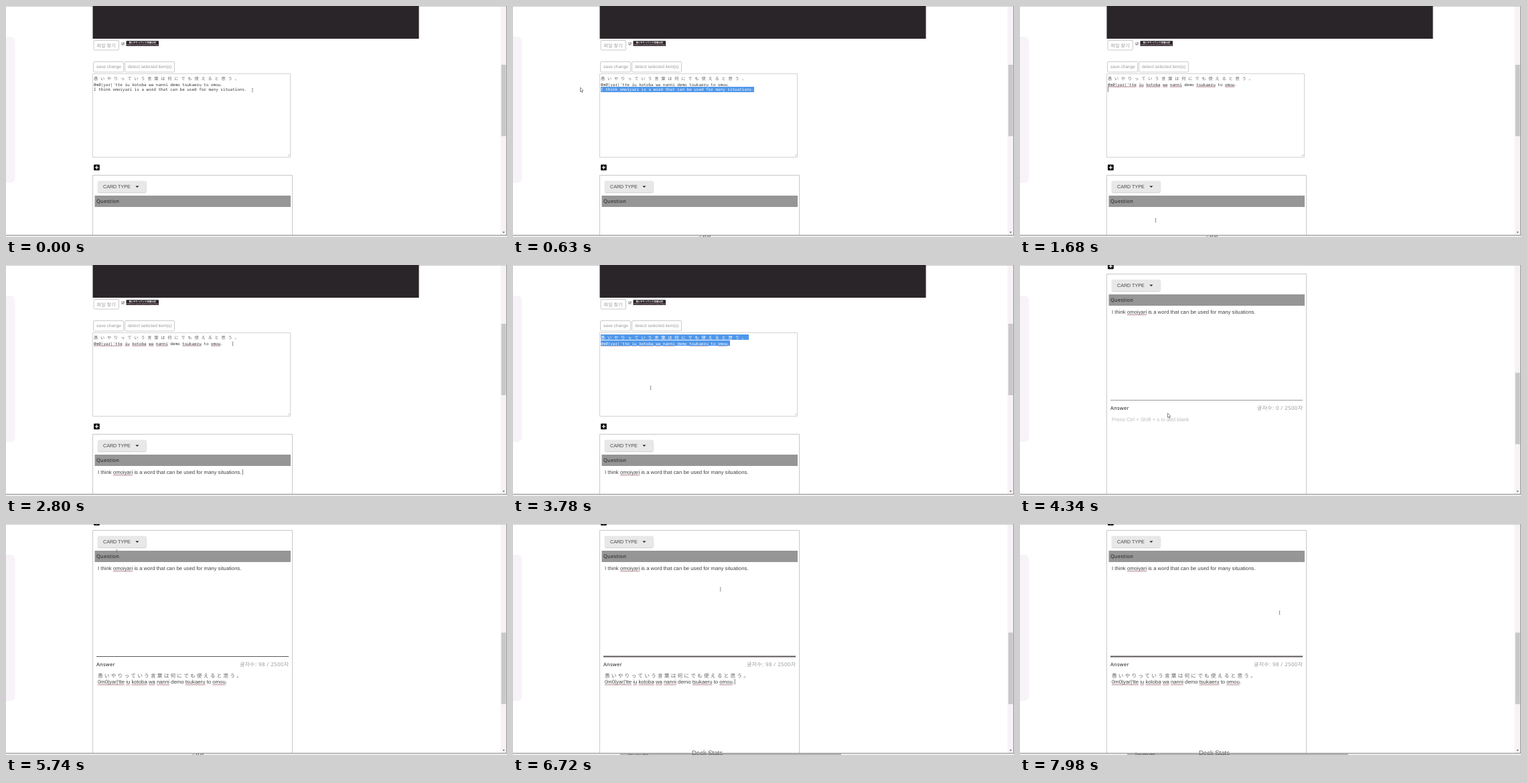
Recreate the animation shown at these times as an HTML page with a canvas. Size 748 by 346 pixels, loop 8000 ms.

```html
<!DOCTYPE html>
<html lang="en">
<head>
<meta charset="utf-8">
<title>Flash card editor</title>
<style>
  html, body { margin: 0; height: 100%; overflow: hidden; background: #fff; }
  canvas { display: block; width: 748px; height: 346px; }
</style>
</head>
<body>
<canvas id="stage"></canvas>
<script>
const W = 748, H = 346, LOOP = 8000, STEP = 70;
const canvas = document.getElementById('stage');
const ratio = window.devicePixelRatio || 1;
canvas.width = W * ratio;
canvas.height = H * ratio;
const c = canvas.getContext('2d');

const SANS = '"Liberation Sans", "Noto Sans CJK JP", "Noto Sans CJK KR", sans-serif';
const LABEL = '"Noto Sans", "Noto Sans CJK KR", sans-serif';
const MONO = '"Noto Sans Mono", "Noto Sans CJK JP", monospace';
const BODY = '7.78px ' + SANS;

const JAPANESE = '愚 い や り っ て い う 言 葉 は 何 に で も 使 え る と 思 う 。';
const ROMAJI = "0m0|yar|'tte iu kotoba wa nanni demo tsukaeru to omou.";
const ENGLISH = 'I think omoiyari is a word that can be used for many situations.';
const MISSPELT = ["0m0|yar|'tte", 'iu', 'kotoba', 'wa', 'nanni', 'tsukaeru', 'omou', 'omoiyari'];

const NOTE = [
  { text: JAPANESE, font: '300 6.28px ' + MONO, color: '#666', base: 110.8, top: 104, end: 352 },
  { text: ROMAJI, font: '5.96px ' + MONO, color: '#333', base: 119.6, top: 113, end: 324 },
  { text: ENGLISH, font: '5.96px ' + MONO, color: '#333', base: 127.1, top: 121, end: 360 }
];

const MOUSE = [
  [0, 367.5, 126], [70, 366, 126], [630, 101, 126], [980, 101, 126], [1680, 202, 321],
  [1750, 187, 320], [2380, 187, 320], [2800, 338, 118], [2900, 338, 118], [3290, 99, 92],
  [3430, 99, 92], [3710, 205, 184], [3780, 205, 184], [3920, 224, 212], [4130, 224, 212],
  [4200, 224, 215], [4340, 221, 226], [5460, 221, 226], [5740, 165, 41], [5880, 166, 33],
  [6510, 166, 33], [6860, 387, 133]
];
const SCROLL = [[4060, 0], [4130, 3], [4200, 22], [4270, 131], [4340, 240], [4410, 243.5], [4480, 244]];

const linear = k => k;
const smooth = k => k * k * (3 - 2 * k);
const clamp = (v, lo, hi) => Math.min(hi, Math.max(lo, v));
const within = (t, from, to) => t >= from && t < to;

// Values of a keyframe track at time t
function track(keys, t, ease) {
  const i = keys.findIndex(k => k[0] > t);
  if (i === 0) return keys[0].slice(1);
  if (i < 0) return keys[keys.length - 1].slice(1);
  const a = keys[i - 1], b = keys[i];
  const k = ease((t - a[0]) / (b[0] - a[0]));
  return a.slice(1).map((v, n) => v + (b[n + 1] - v) * k);
}

function rect(x, y, w, h, fill) {
  c.fillStyle = fill;
  c.fillRect(x, y, w, h);
}

function round(x, y, w, h, r, fill, stroke) {
  c.beginPath();
  c.roundRect(x, y, w, h, r);
  if (fill) { c.fillStyle = fill; c.fill(); }
  if (stroke) { c.strokeStyle = stroke; c.lineWidth = 1; c.stroke(); }
}

function path(points, fill) {
  c.beginPath();
  points.forEach(p => c.lineTo(...p));
  c.closePath();
  c.fillStyle = fill;
  c.fill();
}

function line(x1, y1, x2, y2, color, width = 1) {
  c.beginPath();
  c.moveTo(x1, y1);
  c.lineTo(x2, y2);
  c.strokeStyle = color;
  c.lineWidth = width;
  c.stroke();
}

function text(string, x, y, font, color, spacing = 0, align = 'left') {
  c.font = font;
  c.letterSpacing = spacing + 'px';
  c.textAlign = align;
  c.fillStyle = color;
  c.fillText(string, x, y);
}

function underline(string, x, y, font) {
  c.font = font;
  c.letterSpacing = '0px';
  c.textAlign = 'left';
  let at = 0;
  for (const part of string.split(' ')) {
    const word = part.replace(/\.$/, '');
    if (MISSPELT.includes(word)) {
      const left = x + c.measureText(string.slice(0, at)).width;
      line(left, y, left + c.measureText(word).width, y, '#a0646a', 0.8);
    }
    at += part.length + 1;
  }
}

const caret = (x, y) => rect(x, y, 0.8, 8.5, '#666');

function button(label, x, y, w, h, base, size) {
  round(x, y, w, h, 1.5, '#fff', '#cacaca');
  text(label, x + 4.5, base, size + 'px ' + SANS, '#9a9a9a');
}

function drawToolbar() {
  rect(129.5, -10, 487, 59, '#2a2528');
  button('파일 찾기', 131, 51.5, 37.5, 14.5, 61.6, 7.1);
  round(172.5, 54.5, 4, 4, 0.5, '#fff', '#bbb');
  line(173.3, 56.5, 174.3, 57.8, '#444', 0.8);
  line(174.3, 57.8, 176.3, 54.8, '#444', 0.8);
  rect(179.5, 52.3, 48.5, 7.7, '#2a2328');
  text('愚いやりっていう言葉は何', 203.7, 55.6, 'bold 3.4px ' + SANS, '#fff', 0, 'center');
  text('I think it is a word used for many things', 203.7, 58.7, 'bold 2.5px ' + SANS, '#ecc8d2', 0, 'center');
  button('save change', 130.5, 83.5, 45, 15.5, 93.2, 6.52);
  button('detect selected item(s)', 177.5, 83.5, 74, 15.5, 93.2, 6.52);
}

function selectionStart(t, row, mx, my) {
  const x = clamp(mx, 131, NOTE[row].end);
  if (row === 2) return within(t, 70, 980) ? x : null;
  if (!within(t, 2940, 3850)) return null;
  if (t > 3290) return 131;
  if (row === 1) return my > 112.5 ? x : 131;
  return my > 112.5 ? null : x;
}

function drawNote(t, mx, my) {
  round(129.5, 101.5, 295, 125, 0, '#fff', '#d2d2d2');
  line(420.5, 225, 423.5, 222, '#bbb', 0.7);
  line(422, 225, 423.5, 223.5, '#bbb', 0.7);
  const rows = t < 980 ? 3 : t < 3850 ? 2 : 0;
  NOTE.slice(0, rows).forEach((row, i) => {
    text(row.text, 131, row.base, row.font, row.color);
    if (t >= 980) underline(row.text, 131, row.base + 1.4, row.font);
    const start = selectionStart(t, i, mx, my);
    if (start === null) return;
    c.save();
    c.beginPath();
    c.rect(start, row.top, row.end - start, 8.3);
    c.clip();
    rect(start, row.top, row.end - start, 8.3, '#4f97ea');
    text(row.text, 131, row.base, row.font, '#fff');
    c.restore();
  });
  if (within(t, 980, 1960)) caret(131, 120.5);
  if (t >= 3850) caret(131, 103.5);
}

function drawCard(t, my, scroll) {
  round(131, 237.5, 8.8, 8.8, 1, '#111');
  line(132.8, 241.9, 138, 241.9, '#fff', 1.2);
  line(135.4, 239.3, 135.4, 244.5, '#fff', 1.2);
  round(129.5, 253.5, 298, 500, 0, '#fff', '#c8c8c8');

  c.shadowColor = 'rgba(0,0,0,.25)';
  c.shadowBlur = 1.5 * ratio;
  c.shadowOffsetY = 0.7 * ratio;
  round(137, 262, 72.5, 17, 2, '#e8e8e8');
  c.shadowColor = 'transparent';
  text('CARD TYPE', 145, 272.8, '7.15px ' + SANS, '#444');
  path([[193.3, 269.4], [198.5, 269.4], [195.9, 272]], '#222');

  rect(132.5, 284, 292.5, 17, '#969696');
  text('Question', 135, 295, '7.5px ' + LABEL, '#222', 0.25);
  if (t >= 2240) {
    text(ENGLISH, 137, 312.8, BODY, '#444');
    if (t >= 2380) underline(ENGLISH, 137, 314.6, BODY);
  }
  if (within(t, 2030, 2240)) caret(137, 306);
  if (within(t, 2240, 2940)) caret(353, 306);

  const hover = scroll > 200 && my > 57 && my < 198;
  const dark = hover || within(t, 5460, 5880);
  line(135, 442.5, 422, 442.5, dark ? '#5e565b' : '#999', hover ? 1.8 : 1.2);

  const answered = t >= 5180;
  text('Answer', 135, 456.7, '7.5px ' + LABEL, '#222', 0.25);
  text(`글자수: ${answered ? 98 : 0} / 2500자`, 422.4, 456.7, '7.8px ' + LABEL, '#999', 0.45, 'right');
  if (answered) {
    text(JAPANESE, 137, 474, '300 7.72px ' + SANS, '#666');
    text(ROMAJI, 137, 483.2, BODY, '#444');
    if (t >= 5320) underline(ROMAJI, 137, 484.8, BODY);
  } else {
    text('Press Ctrl + Shift + s to add blank', 137, 474, BODY, '#bcbcbc');
  }
  if (within(t, 4760, 5180)) caret(137, 467);
  if ([[5180, 5670], [6230, 6800], [7350, 7980]].some(s => within(t, ...s))) caret(330.8, 476);
}

function drawWindow(t, scroll) {
  rect(738.5, 1, 8.5, 342, '#f6f2f6');
  rect(739.5, 88 + scroll * 0.306, 7, 107, '#c9c8c9');
  path([[741.4, 338], [744.6, 338], [743, 340.2]], '#666');
  rect(0, 343, W, 3, '#ededed');
  if (t >= 6650) {
    rect(160, 343, 330, 3, '#b4b4b4');
    text('layouts', 172, t < 7700 ? 349.5 : 349, '9.5px ' + SANS, '#555');
    text('Deck Stats', 267, 346, '9.5px ' + SANS, '#555');
  } else if (within(t, 350, 2500) || t >= 4970) {
    text('곡선설', 275, 348.5, '7.5px ' + SANS, '#555');
  }
  rect(0, 342.8, W, 1.2, '#999');
  rect(746.9, 0, 1.1, 343, '#999');
}

function drawMouse(t, x, y) {
  const arrow = within(t, 4130, 4480) || (within(t, 630, 1100) && x < 129) || within(t, 5810, 6580);
  if (arrow) {
    c.beginPath();
    [[0, 0], [0, 6.5], [1.5, 5.2], [2.6, 7.6], [3.5, 7.2], [2.5, 4.9], [4.5, 4.7]]
      .forEach(([dx, dy]) => c.lineTo(x - 0.5 + dx, y - 4 + dy));
    c.closePath();
    c.fillStyle = '#fff';
    c.fill();
    c.strokeStyle = '#555';
    c.lineWidth = 0.7;
    c.stroke();
  } else {
    line(x + 0.5, y - 2.7, x + 0.5, y + 2.7, '#777', 0.8);
    line(x - 0.8, y - 2.7, x + 1.8, y - 2.7, '#999', 0.6);
    line(x - 0.8, y + 2.7, x + 1.8, y + 2.7, '#999', 0.6);
  }
}

function draw(t) {
  const [mx, my] = track(MOUSE, t, smooth);
  const [scroll] = track(SCROLL, t, linear);
  c.setTransform(ratio, 0, 0, ratio, 0, 0);
  c.textRendering = 'geometricPrecision';
  rect(0, 0, W, H, '#fff');
  rect(0, 0, W, 0.8, '#c4c4c4');
  round(-10, 46, 23.5, 219, 7, '#f8f3f9');

  c.save();
  c.translate(0, -scroll);
  drawToolbar();
  drawNote(t, mx, my);
  drawCard(t, my, scroll);
  c.restore();

  drawWindow(t, scroll);
  drawMouse(t, mx, my);
}

function tick() {
  const t = performance.now() % LOOP;
  draw(Math.floor(t / STEP) * STEP);
  requestAnimationFrame(tick);
}
tick();
</script>
</body>
</html>
```
